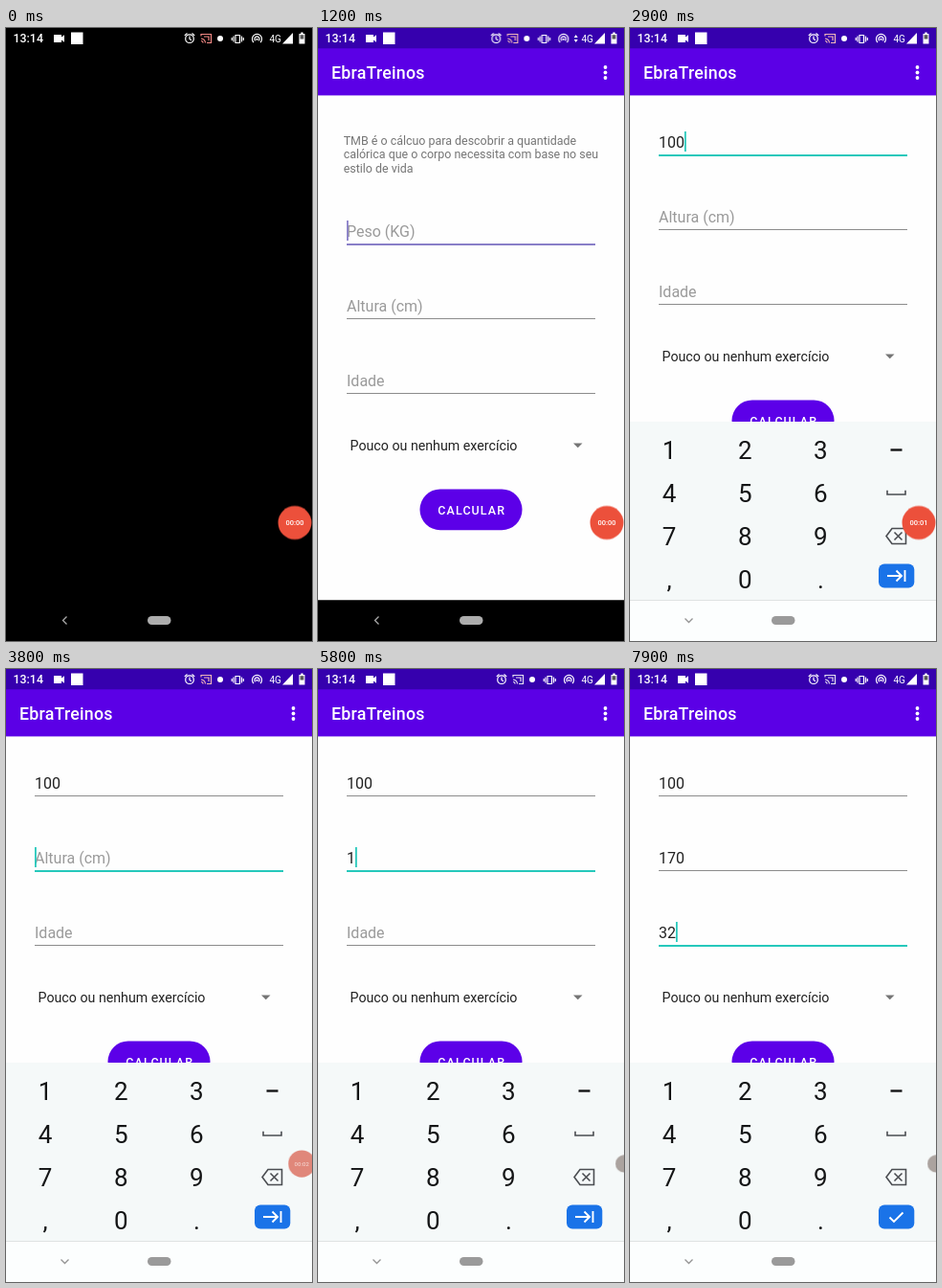
Recreate the animation shown at these times as an HTML page. Size 320x640 px, loop 8 s.

```html
<!DOCTYPE html>
<html lang="pt">
<head>
<meta charset="utf-8">
<title>TMB</title>
<style>
html, body { margin: 0; width: 100%; height: 100%; overflow: hidden; background: #000; }
svg { display: block; width: 100%; height: 100%; font-family: Roboto, Arial, sans-serif; }
.loop { animation: 8s linear infinite; }
.mid { text-anchor: middle; }
.line { fill: none; stroke: #fff; stroke-width: 1.2; }

#app { animation-name: open; }
@keyframes open { 0%, 3% { opacity: 0 } 7.5%, 100% { opacity: 1 } }

#page { animation-name: scroll; animation-timing-function: step-end; }
@keyframes scroll { 0% { transform: none } 17.5%, 100% { transform: translateY(-93px) } }

#keys { animation-name: rise; }
@keyframes rise {
  0%, 17.5% { transform: translateY(187px); animation-timing-function: ease-out }
  20%, 100% { transform: none }
}

#thumb { animation-name: thumb; }
@keyframes thumb { 0%, 17.4% { opacity: 0 } 17.5%, 29% { opacity: 1 } 32%, 100% { opacity: 0 } }

#navDark, #navLight { animation-timing-function: step-end; }
#navDark { animation-name: dark; }
#navLight { animation-name: light; }
@keyframes dark { 0% { visibility: visible } 17.5%, 100% { visibility: hidden } }
@keyframes light { 0% { visibility: hidden } 17.5%, 100% { visibility: visible } }

#icons, #net, #data, #cast { animation-timing-function: step-end; }
#icons { animation-name: icons; }
#net { animation-name: net; }
#data { animation-name: data; }
#cast { animation-name: cast; }
@keyframes icons {
  0% { transform: none } 10% { transform: translateX(-5.7px) }
  21.25% { transform: translateX(-3px) } 32.5%, 100% { transform: none }
}
@keyframes net { 0% { transform: none } 21.25% { transform: translateX(-3px) } 32.5%, 100% { transform: none } }
@keyframes data { 0% { visibility: hidden } 10% { visibility: visible } 21.25%, 100% { visibility: hidden } }
@keyframes cast { 0% { stroke: #f58a86 } 3.75% { stroke: #f0b8b8 } 55%, 100% { stroke: #e6e0f0 } }

#rec { animation-name: dock; }
@keyframes dock {
  0%, 45% { transform: translate(302px, 516.5px) scale(1) }
  51.25%, 100% { transform: translate(320px, 516.5px) scale(.52) }
}
#dot { animation-name: grey; }
@keyframes grey { 0%, 45% { fill: #ec503b } 47.5% { fill: #e0877a } 53%, 100% { fill: #aba39f } }
#clock { animation-name: fade; }
@keyframes fade { 0%, 45% { opacity: 1 } 51.25%, 100% { opacity: 0 } }
</style>
</head>
<body>
<svg viewBox="0 0 320 640" preserveAspectRatio="none">
  <rect width="320" height="640"/>

  <g id="app" class="loop">
    <rect width="320" height="597.5" fill="#fefefe"/>
    <g id="page" class="loop">
      <g font-size="12.44" fill="#757575">
        <text x="26.7" y="122">TMB é o cálcuo para descobrir a quantidade</text>
        <text x="26.7" y="136.3">calórica que o corpo necessita com base no seu</text>
        <text x="26.7" y="150.6">estilo de vida</text>
      </g>
      <g id="form" font-size="16"></g>
      <rect id="caret" width="1.8" height="21"/>
      <text x="33.5" y="441" font-size="14.22" fill="#222">Pouco ou nenhum exercício</text>
      <path d="M267 433.5h9.5l-4.75 4.8z" fill="#757575"/>
      <rect x="106.5" y="481.5" width="107" height="42.7" rx="21.3" fill="#5c00e8"/>
      <text class="mid" x="160.7" y="508" font-size="12.44" font-weight="500" letter-spacing="1.1" fill="#fff">CALCULAR</text>
    </g>
    <rect id="thumb" class="loop" x="316" y="71" width="4" height="293" fill="#b4b4b4"/>
    <rect y="21" width="320" height="49.4" fill="#5b00e6"/>
    <rect width="320" height="21.3" fill="#3600ae"/>
    <text x="14" y="53.3" font-size="17.8" font-weight="500" letter-spacing=".22" fill="#fff">EbraTreinos</text>
    <g fill="#fff">
      <circle cx="300.5" cy="41" r="1.9"/><circle cx="300.5" cy="46.5" r="1.9"/><circle cx="300.5" cy="52" r="1.9"/>
    </g>
  </g>

  <g id="keys" class="loop">
    <rect y="411" width="320" height="187" fill="#f5f9f9"/>
    <g id="digits" class="mid" font-size="26" fill="#141516"></g>
    <path d="M272.5 440.5h12" stroke="#141516" stroke-width="2.4"/>
    <g fill="none" stroke="#4a4d51" stroke-width="1.6">
      <path d="M269 482.8v4.2h19v-4.2"/>
      <path d="M274 522.5h14.5v16H274l-6-8zM276.5 526.5l8 8m0-8l-8 8"/>
    </g>
    <rect x="260" y="559.5" width="37.3" height="25" rx="6" fill="#1a73e8"/>
    <g fill="none" stroke="#fff" stroke-width="1.9">
      <path id="tab" d="M269 572h15m-5.5-5.5l5.5 5.5l-5.5 5.5M287.5 566v12"/>
      <path id="done" d="M271.5 572.5l4.5 4.5l9.5-9.5"/>
    </g>
  </g>

  <g id="navDark" class="loop">
    <rect y="597.5" width="320" height="42.5"/>
    <path d="M63.5 614.5l-4 4l4 4" fill="none" stroke="#aaa" stroke-width="1.3"/>
    <rect x="148" y="614" width="24.5" height="9" rx="4.5" fill="#adadad"/>
  </g>
  <g id="navLight" class="loop">
    <rect y="597" width="320" height="43" fill="#fcfefe"/>
    <rect y="597" width="320" height="1" fill="#dfe3e3"/>
    <path d="M57.5 616.5l4 4l4-4" fill="none" stroke="#949494" stroke-width="1.3"/>
    <rect x="148" y="614" width="24.5" height="9" rx="4.5" fill="#9a9a9a"/>
  </g>

  <g fill="#fff">
    <text x="7.5" y="15.2" font-size="12.4" font-weight="500">13:14</text>
    <path d="M50 7h8v2.6l3-2.4v7.6l-3-2.4V15h-8z"/>
    <rect x="68" y="4.5" width="12.5" height="12.5"/>
    <g id="icons" class="loop">
      <g class="line">
        <circle cx="192" cy="11.2" r="4.3"/>
        <path d="M192 8.5v3l2 1.2M186.8 8l2.7-2.5M197.2 8l-2.7-2.5"/>
        <path id="cast" class="loop" d="M204 8.5V6.5h10.5v9H210M204 11a5 5 0 0 1 4.5 4.5M204 13.5a2 2 0 0 1 2 2M207 9h5v4"/>
        <path d="M240 7.5h4.5v8H240zM238 8.5v6M246.5 8.5v6M236.2 10v3M248.3 10v3"/>
        <path d="M259 15a5 5 0 1 1 7 0M260.8 13.2a2.5 2.5 0 1 1 3.4 0"/>
      </g>
      <circle cx="262.5" cy="11.8" r="1.1"/>
      <circle cx="224" cy="11" r="3"/>
    </g>
    <path id="data" class="loop" d="M267.7 10l2-3l2 3zM267.7 12l2 3l2-3z"/>
    <g id="net" class="loop">
      <text x="275.5" y="14.5" font-size="10">4G</text>
      <path d="M300 5v11.5h-11z"/>
    </g>
    <path d="M306.5 6h1.8V4.5h2.4V6h1.8v10.5h-6z"/>
    <rect x="307.6" y="7.2" width="3.8" height="4.3" fill="#222" opacity=".75"/>
  </g>

  <g id="rec" class="loop">
    <circle id="dot" class="loop" r="17.5"/>
    <text id="clock" class="loop mid" y="2.7" font-size="7.5" font-weight="500" fill="#fff"></text>
  </g>
</svg>
<script>
const $ = id => document.getElementById(id);
const LOOP = 8000, DIGIT = 8.98;
const hints = ['Peso (KG)', 'Altura (cm)', 'Idade'];
// time, focused field, its text
const steps = [
  [0, 0, ''], [2000, 0, '1'], [2550, 0, '10'], [2850, 0, '100'],
  [3400, 1, ''], [4300, 1, '6'], [5300, 1, ''], [5600, 1, '1'], [5850, 1, '17'], [6100, 1, '170'],
  [6900, 2, ''], [7400, 2, '3'], [7700, 2, '32']
];

function add(parent, tag, attrs) {
  const el = document.createElementNS('http://www.w3.org/2000/svg', tag);
  for (const k in attrs) el.setAttribute(k, attrs[k]);
  return parent.appendChild(el);
}

const lineY = i => 225 + 78 * i;
const fields = hints.map((hint, i) => ({
  text: add($('form'), 'text', { x: 30, y: lineY(i) - 7.2 }),
  rule: add($('form'), 'rect', { x: 30, y: lineY(i), width: 260 })
}));

['123', '456', '789', ',0.'].forEach((row, r) =>
  [...row].forEach((ch, c) => {
    add($('digits'), 'text', { x: 41 + 79.2 * c, y: 449.5 + 45 * r }).textContent = ch;
  }));

function draw(now) {
  const t = now % LOOP;
  const values = ['', '', ''];
  let focus = 0, since = 0;
  for (const [at, field, text] of steps) {
    if (at > t) break;
    values[field] = text;
    focus = field;
    since = at;
  }
  const accent = t < 1500 ? '#897fc8' : '#26c8bb';
  fields.forEach(({ text, rule }, i) => {
    const on = i === focus;
    text.textContent = values[i] || hints[i];
    text.setAttribute('fill', values[i] ? '#222' : '#9a9a9a');
    rule.setAttribute('height', on ? 2 : 1);
    rule.setAttribute('fill', on ? accent : '#8c8c8c');
  });
  const caret = $('caret');
  caret.setAttribute('x', 30 + DIGIT * values[focus].length);
  caret.setAttribute('y', lineY(focus) - 24);
  caret.setAttribute('fill', accent);
  caret.setAttribute('opacity', (t - since) % 1000 < 500 ? 1 : 0);
  $('tab').setAttribute('opacity', focus < 2 ? 1 : 0);
  $('done').setAttribute('opacity', focus < 2 ? 0 : 1);
  $('clock').textContent = '00:0' + Math.max(0, Math.floor(t / 1000) - 1);
}

function tick() {
  draw(performance.now());
  requestAnimationFrame(tick);
}
tick();
</script>
</body>
</html>
```
